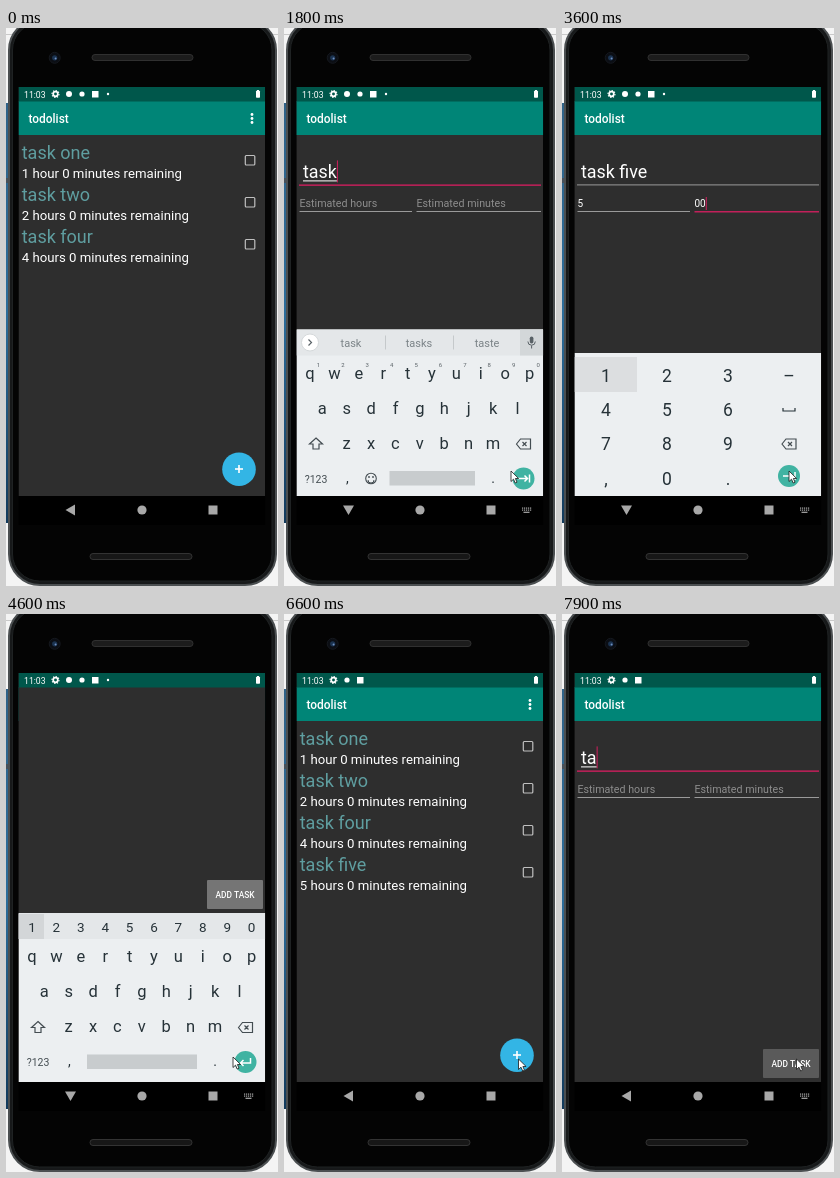
These frames come from a looping animation (272 by 558 pixels, 8000 ms). An HTML page with a canvas:

```html
<!DOCTYPE html>
<html lang="en">
<head>
<meta charset="utf-8">
<title>To-do list on a phone</title>
<style>
html, body { margin: 0; width: 100%; height: 100%; overflow: hidden; background: #fff; }
canvas { display: block; width: 272px; height: 558px; }
</style>
</head>
<body>
<canvas id="stage"></canvas>
<script>
const canvas = document.getElementById('stage');
const dpr = window.devicePixelRatio || 1;
canvas.width = 272 * dpr;
canvas.height = 558 * dpr;
const c = canvas.getContext('2d');
const LOOP = 8000, LEFT = 12.5, WIDTH = 246.7;
const TEAL = '#008577', DARK = '#2e2e2e', PINK = '#c2205a', INK = '#263238';

// Drawing helpers
const rect = (x, y, w, h, fill) => { c.fillStyle = fill; c.fillRect(x, y, w, h); };
const band = (y, h, fill) => rect(LEFT, y, WIDTH, h, fill);
function round(x, y, w, h, r, fill, stroke, width = 1) {
  c.beginPath();
  c.roundRect(x, y, w, h, r);
  paint(fill, stroke, width);
}
function paint(fill, stroke, width = 1) {
  if (fill) { c.fillStyle = fill; c.fill(); }
  if (stroke) { c.strokeStyle = stroke; c.lineWidth = width; c.stroke(); }
}
function circle(x, y, r, fill, stroke, width) {
  c.beginPath();
  c.arc(x, y, r, 0, 7);
  paint(fill, stroke, width);
}
function shape(d, fill, stroke, width, x = 0, y = 0) {
  c.save();
  c.translate(x, y);
  const p = new Path2D(d);
  if (fill) { c.fillStyle = fill; c.fill(p); }
  if (stroke) { c.strokeStyle = stroke; c.lineWidth = width; c.stroke(p); }
  c.restore();
}
function text(s, x, y, size, fill, align = 'left', weight = 400) {
  c.font = `${weight} ${size}px Roboto, "Liberation Sans", sans-serif`;
  c.textAlign = align;
  c.fillStyle = fill;
  c.fillText(s, x, y);
  return c.measureText(s).width;
}
function layer(alpha, dy, draw) {
  if (alpha <= 0) return;
  c.save();
  c.globalAlpha *= alpha;
  c.translate(0, dy);
  draw();
  c.restore();
}

// Timing helpers
const between = (t, a, b) => t >= a && t < b;
const ramp = (t, a, b) => {
  const p = Math.min(1, Math.max(0, (t - a) / (b - a)));
  return 1 - (1 - p) ** 3;
};
const typed = (s, t, start) => s.slice(0, Math.max(0, Math.floor((t - start) / 100) + 1));

function phone() {
  rect(0, 0, 272, 558, '#f4f4f4');
  rect(0, 6, 272, 1, '#c9c9c9');
  const sea = c.createLinearGradient(0, 75, 0, 495);
  sea.addColorStop(0, '#2f6288');
  sea.addColorStop(.5, '#2c6d9b');
  sea.addColorStop(1, '#123a5c');
  rect(0, 75, 6, 420, sea);
  rect(0, 150, 5, 5, '#45515c');
  round(3, -9, 267, 566, 31, '#17191a', '#4b4f51', 2);
  round(6.5, -5, 259.5, 558, 27, '#040404', '#1f2223');
  circle(48.7, 29.8, 5.5, '#0b0e14', '#15181e');
  circle(48.7, 29.8, 2.6, '#1b3350');
  circle(49.6, 30.6, 1, '#6f8fc0');
  round(86, 26.5, 101, 6, 3, '#1c1c1c', '#303030');
  round(84, 525.5, 102, 6, 3, '#171717', '#333');
}

function statusBar(t) {
  band(59, 14.5, '#00574b');
  text('11:03', 18, 70, 8.7, '#fff');
  circle(49.5, 66, 2.3, null, '#fff', 1.7);
  c.save();
  c.setLineDash([1.3, 1.4]);
  circle(49.5, 66, 3.5, null, '#fff', 1.1);
  c.restore();
  const full = t < 5000;
  if (full) circle(63, 66, 3, '#fff');
  const x = full ? 76 : 63;
  circle(x, 66, 2.6, '#fff');
  rect(x + 10, 63, 6.5, 6.5, '#fff');
  if (full) circle(102, 66, 1.2, '#fff');
  round(250, 62.8, 4, 7, .7, '#fff');
  rect(251, 62, 2, 1, '#fff');
}

function page() {
  band(59, 409, DARK);
  band(73, 34, TEAL);
  text('todolist', 22.5, 95, 11.9, '#fff', 'left', 500);
}

function listPage(t) {
  page();
  for (const y of [86.5, 90.5, 94.5]) circle(246, y, 1.4, '#fff');
  const tasks = [['one', 1], ['two', 2], ['four', 4]];
  if (t >= 5800) tasks.push(['five', 5]);
  tasks.forEach(([name, hours], i) => {
    const y = 42 * i;
    text('task ' + name, 15.7, y + 131, 18, '#5f9ea0');
    text(`${hours} hour${hours > 1 ? 's' : ''} 0 minutes remaining`, 15.7, y + 150, 13.2, '#fff');
    round(239.3, y + 127.5, 9.5, 9.5, 1, null, '#c0c0c0', 1.2);
  });
  circle(233, 441.2, 16.8, '#33b5e5');
  for (const start of [650, 6750]) {
    if (between(t, start, start + 350)) {
      circle(233, 441, 16.8 * ramp(t, start, start + 250), 'rgba(255,255,255,.25)');
    }
  }
  rect(229, 440.2, 8, 1.6, '#fff');
  rect(232.2, 437, 1.6, 8, '#fff');
}

function field(s, hint, x, y, size, right, focus, pad, compose) {
  const w = text(s || hint, x + pad, y, size, s ? '#fff' : '#8d8d8d');
  const shown = s ? w : 0, big = size > 15;
  rect(x, y + (big ? 6 : 4), right - x, focus ? 1.5 : 1, focus ? PINK : '#9a9a9a');
  if (focus) rect(x + pad + shown, y - (big ? 18 : 10), 1.1, big ? 22 : 13, PINK);
  if (compose && s) {
    const head = s.slice(0, s.lastIndexOf(' ') + 1);
    const skip = c.measureText(head).width;
    rect(x + pad + skip, y + 2, shown - skip, 1, '#fff');
  }
}

function addPage(s) {
  page();
  field(s.name, 'Task name', 15, 150.4, 17.9, 257, s.focus === 1, 4, s.focus === 1);
  field(s.hours, 'Estimated hours', 15.5, 179, s.hours ? 10 : 10.7, 128, s.focus === 2, 0);
  field(s.minutes, 'Estimated minutes', 132.5, 179, s.minutes ? 10 : 10.7, 257, s.focus === 3, 0);
}

function addButton(focused) {
  round(201, 435, 56, 29, 1, focused ? '#757575' : '#5a5a5a');
  text('ADD TASK', 229, 453, 8.4, '#fff', 'center', 500);
}

function deleteKey(x, y) {
  shape('M-7 0L-3 -5H7V5H-3ZM-1 -2L3 2M3 -2L-1 2', null, '#444d52', 1.2, x, y);
}

function actionKey(x, enter) {
  circle(x, 448, 11, '#40b3a2');
  shape(enter ? 'M5 -4V1H-5M-2 -2L-5 1L-2 4' : 'M-6 0H4M1 -3L4 0L1 3M6 -4V4', null, '#fff', 1.5, x, 448);
}

function numberPad(highlight) {
  band(325, 143, '#eceff1');
  if (highlight) rect(LEFT, 329, 62.5, 35, '#dcdee0');
  ['123–', '456', '789', ',0.'].forEach((row, r) => {
    [...row].forEach((k, i) => text(k, 44 + 61 * i, 353.5 + 34.4 * r, 17.5, INK, 'center'));
  });
  shape('M-6 -1V2H6V-1', null, INK, 1.2, 227, 381);
  deleteKey(227, 416);
  actionKey(227, false);
}

function suggestions(word) {
  band(299, 26, '#e4e7e9');
  rect(236, 299, 23.2, 26, '#d3d7d9');
  circle(26, 312, 8.5, '#fff', '#d5d9db');
  shape('M-1.5 -3L1.5 0L-1.5 3', null, '#596166', 1.2, 26, 312);
  const words = word.startsWith('fiv') ? ['five', 'fiver', 'fives']
    : word.startsWith('f') ? ['fi', 'find', 'first'] : ['task', 'tasks', 'taste'];
  words.forEach((w, i) => text(w, 67 + 68 * i, 316, 11, '#7b8387', 'center'));
  rect(101, 305, 1, 14, '#c5c9cb');
  rect(169, 305, 1, 14, '#c5c9cb');
  round(245.8, 306, 3.6, 7, 1.8, '#596166');
  shape('M-3.7 -1A3.7 3.7 0 0 0 3.7 -1M0 3V6', null, '#596166', 1, 247.6, 312);
}

function letters(word, plain) {
  band(299, 169, '#eceff1');
  const digits = '1234567890';
  if (plain) {
    band(299, 26, '#e4e7e9');
    rect(LEFT, 300, 25.5, 25, '#d3d6d8');
    [...digits].forEach((k, i) => text(k, 26 + 24.4 * i, 317.5, 13.5, INK, 'center'));
  } else {
    suggestions(word);
    [...digits].forEach((k, i) => text(k, 34.5 + 24.4 * i, 336, 6, '#596166', 'center'));
  }
  [['qwertyuiop', 26, 348], ['asdfghjkl', 38.3, 383], ['zxcvbnm', 62.6, 418]].forEach(([row, x, y]) => {
    [...row].forEach((k, i) => text(k, x + 24.4 * i, y, 16.5, INK, 'center'));
  });
  shape('M0 -6L6.5 0H3V5H-3V0H-6.5Z', null, '#444d52', 1.2, 32, 413.5);
  deleteKey(239.5, 413.5);
  text('?123', 32, 452, 10.5, '#444d52', 'center');
  text(',', 63.5, 452, 14, INK, 'center');
  text('.', 209, 452, 14, INK, 'center');
  const left = plain ? 81 : 105.5;
  rect(left, 440.5, 191 - left, 14.5, '#c8ccce');
  if (!plain) {
    circle(87, 448, 5.3, null, '#444d52', 1.1);
    circle(85, 446.5, .9, '#444d52');
    circle(89, 446.5, .9, '#444d52');
    shape('M-3 1A3 3 0 0 0 3 1', null, '#444d52', 1, 87, 448.5);
  }
  actionKey(239.5, plain);
}

function navBar(open, input) {
  band(468, 29, '#000');
  shape(open ? 'M-5.5 -4.5H5.5L0 5Z' : 'M4.5 -5.5V5.5L-5 0Z', '#a8a8a8', null, 0, 64.5, 482);
  circle(136, 482, 4.6, '#a8a8a8');
  rect(202.5, 477.5, 9, 9, '#a8a8a8');
  if (!input) return;
  for (let i = 0; i < 10; i++) rect(238 + 2 * (i % 5), i < 5 ? 479.5 : 481.5, 1.2, 1.2, '#aaa');
  rect(239.5, 483.7, 6, 1.2, '#aaa');
}

// Pointer path: time, x, y
const path = [[100, 290, 395], [600, 227, 443], [4900, 227, 443], [5600, 242, 452],
  [6000, 242, 452], [6500, 234.5, 445]];
function pointer(t) {
  if (t <= path[0][0]) return;
  const last = path[path.length - 1];
  let [, x, y] = last;
  const i = path.findIndex(p => p[0] > t);
  if (i > 0) {
    const [t0, x0, y0] = path[i - 1], [t1, x1, y1] = path[i];
    const p = ramp(t, t0, t1);
    x = x0 + (x1 - x0) * p;
    y = y0 + (y1 - y0) * p;
  }
  shape('M0 0V10.5L2.5 8.2L4.2 12L6 11.2L4.4 7.5H7.6Z', '#fff', '#1a1a1a', .8, x, y);
}

function draw(t) {
  const second = t >= 6900;
  const add = second ? ramp(t, 6950, 7250) : ramp(t, 800, 1100) - ramp(t, 5850, 6150);
  const keys = ramp(t, 1650, 1850) - ramp(t, 5800, 6050);
  const pan = second ? 0 : ramp(t, 3750, 4000);
  const form = second
    ? { name: typed('ta', t, 7780), hours: '', minutes: '', focus: t >= 7650 ? 1 : 0 }
    : {
      name: typed('task five', t, 1490),
      hours: t >= 2900 ? '5' : '',
      minutes: typed('00', t, 3300),
      focus: t < 1400 ? 0 : t < 2600 ? 1 : t < 3100 ? 2 : t < 3750 ? 3 : 0
    };

  phone();
  c.save();
  c.beginPath();
  c.rect(LEFT, 59, WIDTH, 409);
  c.clip();
  listPage(t);
  layer(add, 22 * (1 - add), () => {
    layer(1, -169 * pan, () => {
      addPage(form);
      // Plain ground fills the space uncovered by the upward pan
      band(468, 170, DARK);
      addButton(pan > 0);
    });
  });
  if (keys > 0) {
    layer(1, 170 * (1 - keys), () => {
      if (between(t, 2600, 3750)) numberPad(t >= 3400);
      else letters(form.name.split(' ').pop(), t >= 3750);
    });
  }
  statusBar(t);
  c.restore();
  navBar(keys > .1, between(t, 1500, 5900) || t >= 7700);
  pointer(t);
}

function frame() {
  c.setTransform(dpr, 0, 0, dpr, 0, 0);
  draw(performance.now() % LOOP);
  requestAnimationFrame(frame);
}
frame();
</script>
</body>
</html>
```
